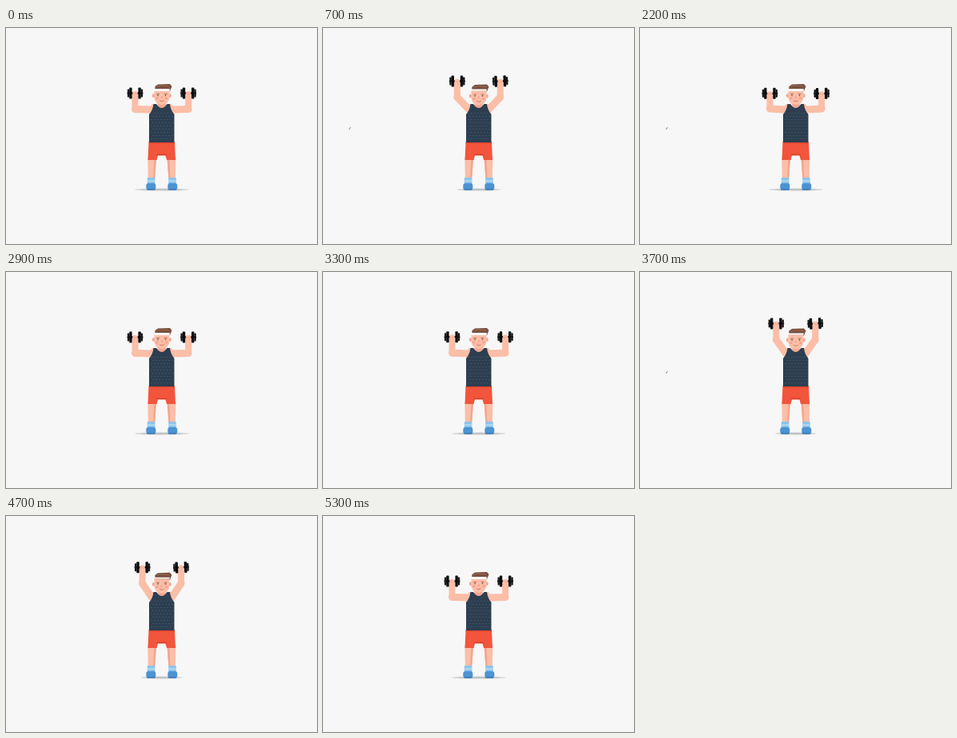
An HTML page with a canvas that plays this animation: 389x270 px, repeating every 5.7 s.

```html
<!DOCTYPE html>
<html lang="en">
<head>
<meta charset="utf-8">
<title>Dumbbell press</title>
<style>
html, body { margin: 0; width: 100%; height: 100%; overflow: hidden; background: #f7f7f7; }
canvas { display: block; width: 389px; height: 270px; }
</style>
</head>
<body>
<canvas id="stage"></canvas>
<script>
const W = 389, H = 270, LOOP = 5700, STEP = 100, AXIS = 194.8;
const SKIN = '#fbbea7', SHADE = '#f3a58e', NAVY = '#2c3e50', RED = '#f2553b', BLUE = '#4c93d2';
const canvas = document.getElementById('stage');
const ctx = canvas.getContext('2d');
const ratio = window.devicePixelRatio || 1;
canvas.width = W * ratio;
canvas.height = H * ratio;

// Two presses: rise start and fall start, in ms
const PRESSES = [[300, 1650], [3250, 4450]];
const RISE = 780, FALL = 600;
const SPECKS = [[500, 1000], [1900, 2400], [3400, 3900], [4800, 5300]];

function ease(t, start, span) {
  const u = Math.min(1, Math.max(0, (t - start) / span));
  return (1 - Math.cos(Math.PI * u)) / 2;
}

const liftAt = t => PRESSES.reduce((sum, [up, down]) => sum + ease(t, up, RISE) - ease(t, down, FALL), 0);

// Brief dip as the weights come to rest
const sagAt = t => PRESSES.reduce((sum, p) => sum + Math.max(0, 1 - Math.abs(t - p[1] - 570) / 250), 0);

function box(x, y, w, h, color, r = 0) {
  ctx.fillStyle = color;
  ctx.beginPath();
  ctx.roundRect(x, y, w, h, r);
  ctx.fill();
}

function oval(x, y, rx, ry, color) {
  ctx.fillStyle = color;
  ctx.beginPath();
  ctx.ellipse(x, y, rx, ry, 0, 0, 2 * Math.PI);
  ctx.fill();
}

function shape(points, color) {
  ctx.fillStyle = color;
  ctx.beginPath();
  points.forEach(([x, y]) => ctx.lineTo(x, y));
  ctx.closePath();
  ctx.fill();
}

function line(points, width, color) {
  ctx.strokeStyle = color;
  ctx.lineWidth = width;
  ctx.lineCap = ctx.lineJoin = 'round';
  ctx.beginPath();
  points.forEach(([x, y]) => ctx.lineTo(x, y));
  ctx.stroke();
}

// Draws a left-hand part and its mirror image
function both(draw) {
  for (const side of [1, -1]) {
    ctx.save();
    ctx.translate(AXIS, 0);
    ctx.scale(side, 1);
    draw(side);
    ctx.restore();
  }
}

function shadow(lift) {
  const half = 34 - 13 * lift;
  oval(AXIS, 202, half, 1.7, '#d9dadb');
  oval(AXIS, 202, half * 0.78, 1.1, '#bfc3c6');
}

function legs() {
  both(() => {
    shape([[-17.5, 162], [-6.8, 162], [-8.6, 189], [-17, 189]], SKIN);
    shape([[-9.6, 164], [-6.8, 164], [-8.6, 188], [-10.6, 188]], SHADE);
    box(-18, 187, 9.5, 9, '#8cc4ea', 1);
    box(-18, 190.5, 9.5, 1.3, '#bfe0f3');
    box(-19.5, 194, 12, 8.5, BLUE, 3);
    box(-18.5, 201, 10.5, 1.5, '#3979b6', 0.7);
  });
  shape([[178.5, 142], [211, 142], [212, 165], [201, 165], [199.5, 159.5],
    [190, 159.5], [188.5, 165], [177.5, 165]], RED);
  box(179, 142.5, 32, 1.8, '#d9452f');
  box(188, 157.5, 13.5, 1.5, '#d9452f', 0.7);
}

function torso() {
  box(189.5, 92, 10.5, 11, SHADE, 2);
  both(() => shape([[-12, 95], [-4, 96], [-3, 106], [-14.5, 108], [-15.5, 101]], SKIN));
  ctx.fillStyle = NAVY;
  ctx.beginPath();
  ctx.moveTo(184.5, 95);
  ctx.lineTo(188, 95);
  ctx.quadraticCurveTo(194.8, 105, 201.5, 95);
  ctx.lineTo(205, 95);
  ctx.quadraticCurveTo(206, 103, 210.5, 108);
  ctx.lineTo(210.5, 143);
  ctx.lineTo(179, 143);
  ctx.lineTo(179, 108);
  ctx.quadraticCurveTo(183.5, 103, 184.5, 95);
  ctx.fill();
  for (let row = 0; row < 9; row++)
    for (let col = 0; col < 7; col++)
      box(181.5 + col * 4 + (row % 2) * 2, 106 + row * 4, 1, 1, '#50667a');
}

function head(lift) {
  ctx.save();
  ctx.translate(0, lift);
  both(() => oval(-10.3, 84.5, 1.6, 2.5, SHADE));
  box(185.5, 74, 18.8, 22, SKIN, [5, 5, 9, 9]);
  shape([[186, 79], [186.5, 73], [190, 70.5], [205, 70], [207.5, 73], [205, 79]], '#79503f');
  line([[188.5, 73.2], [194, 72], [204, 73]], 1, '#9a6a51');
  const band = 3 - 1.6 * lift;
  box(185.3, 76, 19.5, band, '#ffffff', 0.8);
  box(185.5, 76 + band, 18.8, 3.5 - band, SKIN);
  both(() => {
    box(-6.8, 82, 4, 0.9, '#a36c58');
    oval(-4.7, 84.3, 0.8, 0.9, '#6b4a43');
    oval(-6, 88, 1.9, 1.3, '#f7a093');
  });
  box(193.8, 85, 1.9, 3, SHADE, 0.8);
  line([[192.5, 91], [194.8, 91.7], [197.2, 91]], 0.9, '#c9705f');
  ctx.restore();
}

function dumbbell(x, y, tilt) {
  ctx.save();
  ctx.translate(x, y);
  ctx.rotate(tilt);
  box(-10, -1.2, 20, 2.4, '#111214', 1);
  for (const s of [-1, 1]) {
    box(s * 5.6 - 1.7, -7, 3.4, 14, '#0b0c0e', 1);
    box(s * 8.4 - 1.2, -5, 2.4, 10, '#191a1d', 0.8);
  }
  ctx.restore();
}

function arms(lift, sag) {
  const angle = lift * 88 * Math.PI / 180;
  both(side => {
    const shoulder = [-12.3, 102];
    const elbow = [shoulder[0] - 21 * Math.cos(angle) + sag, 101.5 - 21 * Math.sin(angle)];
    const hand = [elbow[0], elbow[1] - 20 + sag];
    line([shoulder, elbow], 9, SKIN);
    line([elbow, [hand[0], hand[1] + 4]], 8, SKIN);
    dumbbell(hand[0], hand[1], side < 0 ? 0.08 * lift : 0);
    box(hand[0] - 3.2, hand[1] - 2.6, 6.4, 6.5, SKIN, 2);
    box(hand[0] - 2.6, hand[1] + 0.2, 5.2, 0.9, SHADE);
  });
}

function draw(t) {
  const lift = liftAt(t);
  ctx.setTransform(ratio, 0, 0, ratio, 0, 0);
  box(0, 0, W, H, '#f7f7f7');
  shadow(lift);
  legs();
  arms(lift, sagAt(t));
  torso();
  head(lift);
  if (SPECKS.some(([on, off]) => t >= on && t < off))
    line([[34.3, 124.3], [32.8, 126.6]], 0.9, '#737373');
}

const start = performance.now();
function tick() {
  const t = (performance.now() - start) % LOOP;
  draw(Math.floor(t / STEP) * STEP);
  requestAnimationFrame(tick);
}
tick();
</script>
</body>
</html>
```
